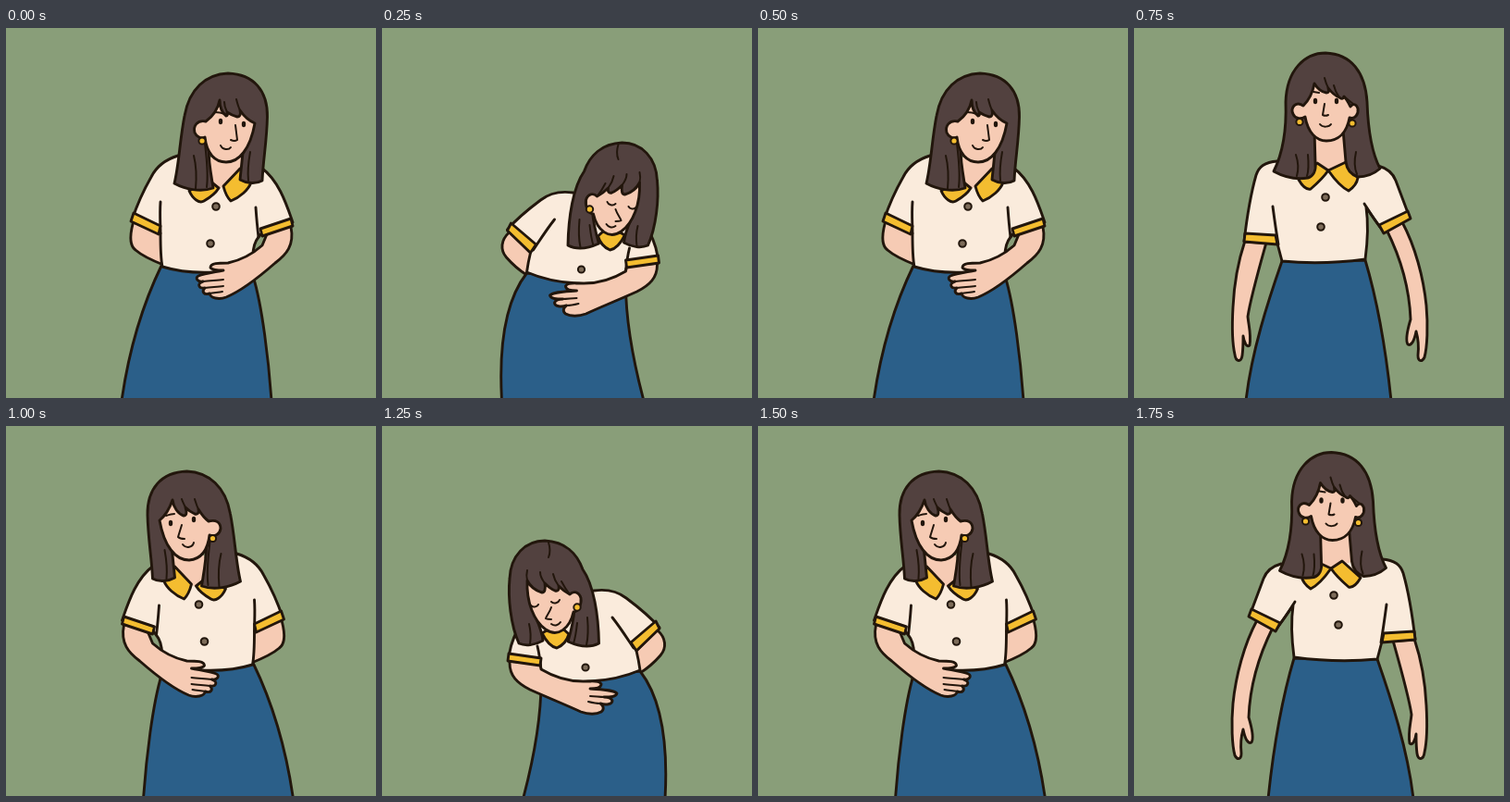
Recreate the animation shown at these times as an HTML page. Size 400x400 px, loop 2000 ms.

```html
<!DOCTYPE html>
<html lang="en">
<head>
<meta charset="utf-8">
<title>Bowing woman</title>
<style>
html, body { margin: 0; width: 100%; height: 100%; overflow: hidden; background: #899e79; }
svg { display: block; width: 100vw; height: 100vh; }
path, circle { fill: none; stroke: #22160c; stroke-width: 2.9; stroke-linecap: round; stroke-linejoin: round; }
.skin { fill: #f6cbb4; }
.hair { fill: #52413f; }
.shirt { fill: #faebdc; }
.gold { fill: #f4bd30; }
.skirt { fill: #2b5f89; }
.thin { stroke-width: 2; }
.button { fill: #7d6c5a; stroke-width: 2; }
.stud { fill: #f4bd30; stroke-width: 2; }
.bare { fill: #f6cbb4; stroke: none; }
.eye { fill: #22160c; stroke: none; }
</style>
</head>
<body>
<svg id="stage" viewBox="0 0 400 400"></svg>
<script>
const shape = (kind, d) => `<path class="${kind}" d="${d}"/>`;
const dot = (kind, r, ...points) => points.map(([x, y]) =>
  `<circle class="${kind}" cx="${x}" cy="${y}" r="${r}"/>`).join('');
const eyes = (...points) => points.map(([x, y]) =>
  `<ellipse class="eye" cx="${x}" cy="${y}" rx="2.2" ry="3.3"/>`).join('');
const flip = (sum, art) => `<g transform="matrix(-1 0 0 1 ${sum} 0)">${art}</g>`;
const shift = (x, y, art) => `<g transform="translate(${x} ${y})">${art}</g>`;

// Upright
const standBody = [
  shape('skin', 'M120 230C112 254 108 280 107 302C106 320 106 340 109 353C110 361 116 362 117 354C118 347 118 340 118 333C119 340 122 346 125 343C127 332 124 322 123 312C126 292 134 264 143 232'),
  shape('skin', 'M290 210C304 236 313 270 316 300C318 322 317 345 314 356C311 362 307 360 307 354C308 345 307 335 305 328C303 338 300 344 296 342C293 337 296 325 299 315C298 288 291 254 273 218'),
  shape('skirt', 'M160 252C145 295 127 350 121 403L278 403C272 345 264 298 250 251Z'),
  shape('shirt', 'M155 144C141 145 135 150 132 159C126 180 122 205 119 231L155 233L160 252C190 255 220 254 250 250C252 235 254 215 251 194L270 221L298 205L283 165C280 157 275 152 264 149'),
  shape('', 'M150 193C152 208 154 222 156 234M249 190C254 198 260 208 266 215'),
  shape('gold', 'M120 222L119 231L155 234L153 224Z'),
  shape('gold', 'M265 213L270 222L299 206L296 198Z'),
  shape('bare', 'M188 112L188 147L210 154L236 146L236 112Z'),
  shape('gold', 'M178 164C182 171 187 175 191 174C198 168 206 160 210 154L198 146Z'),
  shape('gold', 'M210 154C217 164 226 173 232 176C238 172 241 168 242 162L229 145Z'),
  dot('button', 3.8, [207, 183], [202, 215])
].join('');

const standHead = [
  shape('hair', 'M151 155C161 135 165 108 164 80C165 45 185 27 207 27C235 28 250 48 252 80C253 110 257 135 266 152C259 158 252 161 242 161C233 158 230 152 229 145L226 110L195 110L196 146C197 154 194 160 188 162C176 164 162 161 151 155Z'),
  shape('skin', 'M183 84C174 78 169 87 172 93C174 98 180 99 185 96C188 113 197 122 208 122C221 122 230 113 233 97C239 99 243 93 242 87C240 81 236 82 234 85C232 81 230 77 227 74C226 77 224 77 222 75C217 73 213 69 210 65C211 69 210 70 208 70C202 69 198 65 195 60C193 71 189 78 183 84Z'),
  shape('thin', 'M227 74C231 77 234 80 237 82M210 65C208 61 207 58 206 54M222 75C219 71 217 67 216 62M194 69L200 70M206 82L204 94C206 95 208 95 210 94M201 104C204 108 211 107 213 104'),
  shape('thin', 'M175 137C178 146 178 153 176 160M188 137C189 148 189 154 187 160M240 134C238 143 238 151 241 158'),
  eyes([196, 79], [219, 79]),
  dot('stud', 3.6, [179, 101.5], [236, 103])
].join('');

// Half bow: body, hair and arm
const leanBody = [
  shape('skin', 'M137 212C134 224 133 235 140 240C148 247 160 252 170 256L167 218'),
  shape('skirt', 'M168 257C152 290 134 340 125 403L287 403C284 360 277 300 267 268L225 262Z'),
  shape('shirt', 'M186 138C173 142 163 149 157 161C149 175 142 190 136 208L167 222C167 236 167 248 169 258C185 263 205 265 225 264L267 246C267 238 269 231 273 226L277 221L310 210C303 190 295 165 276 151'),
  shape('', 'M167 188C166 202 167 212 167 222M270 194C271 208 272 218 273 226'),
  shape('gold', 'M138 200L135 209L165 223L167 214Z'),
  shape('bare', 'M221 140L222 166L231 174L254 160L255 134Z'),
  shape('gold', 'M198 176C202 185 209 190 214 187C221 183 227 178 230 173L220 165Z'),
  shape('gold', 'M235 171C237 179 240 184 243 187C253 183 262 175 265 167L253 152Z'),
  dot('button', 3.8, [227, 193], [221, 233]),
  shape('hair', 'M182 168C187 148 188 120 193 95C198 66 216 50 240 49C268 50 283 68 282.5 96C282 122 278 142 277 165C270 169 260 168 253 164L257 125L219 130C219 146 222 160 224 173C210 178 193 174 182 168Z'),
  shape('thin', 'M203 138C206 150 206 163 205 174M215 125C217 142 219 157 217 172M264 134C262 145 261 155 262 165')
].join('');

const leanArm = [
  shape('skin', 'M308 215C312 235 303 245 291 254C275 268 255 284 238 291C230 294 221 292 220 287C214 289 211 285 215 281C208 282 206 276 213 274C207 275 204 270 208 268C215 265 225 264 235 262C229 262 223 262 221 259C221 254 230 254 240 254C254 251 268 243 277 235L282 223'),
  shape('thin', 'M213 274C221 273 228 273 235 272M215 281C222 280 229 280 235 279M220 287C225 286 230 286 234 285'),
  shape('gold', 'M275 217L277 225L310 214L308 206Z')
].join('');

const leanRightFace = [
  shape('skin', 'M216 101C207 99 202 106 204 113C206 118 211 120 215 118C217 136 226 145 238 145C252 145 264 131 269 103C262 100 257 95 253 89C254 93 253 96 250 96C246 95 242 93 239 91C240 94 239 95 238 95C233 91 231 86 231 78C229 88 223 96 216 101Z'),
  shape('thin', 'M239 91C237 87 236 84 236 80M253 89C251 85 250 81 249 77M226 91C230 91 234 92 237 93M248 105L250 121C247 123 245 122 243 121M232 127C234 132 241 132 243 129'),
  eyes([232, 101], [257, 104]),
  dot('stud', 3.6, [212, 122])
].join('');

const leanLeftFace = [
  shape('skin', 'M166 102C171 130 183 145 198 145C210 144 218 135 220 118C226 120 231 117 232 111C232 104 227 101 219 103C215 100 211 95 208 90C209 94 207 96 204 95C199 93 196 90 194 88C196 94 195 97 192 97C186 95 181 88 180 80C177 89 172 97 166 102Z'),
  shape('thin', 'M194 88C192 84 191 82 190 79M208 90C206 86 205 82 204 79M173 97C176 96 179 95 182 95M190 107L186 120C188 122 191 122 193 122M191 128C195 133 202 131 203 126'),
  eyes([178, 105], [203, 101]),
  dot('stud', 3.6, [223.5, 121.5])
].join('');

// Full bow
const deepBow = [
  shape('skin', 'M298 221C307 229 308 240 301 248C294 256 287 262 279 267L272 240'),
  shape('skirt', 'M172 268C173 310 164 360 152.5 403L306 403C309 350 304 297 279 265Z'),
  shape('shirt', 'M229 178C243 176 255 179 264 186C276 195 289 205 300 218L275 243C277 251 278 257 279 264C265 270 245 275 225 276C205 277 185 274 172 266L171 258L137 254C137 241 141 231 147 219'),
  shape('', 'M249 207C257 217 264 228 272 240M168 238C170 246 171 253 172 264'),
  shape('gold', 'M269 234L275 243L300 219L296 211Z'),
  shape('gold', 'M173 224C178 234 184 239 189 240C196 237 200 232 202 225L190 214Z'),
  dot('button', 3.6, [220, 261]),
  shape('hair', 'M148 235C139 215 136 185 138 165C139 140 155 124 176 124C198 125 211 138 217 155C229 172 234 205 234.5 235C225 240 212 238 201 233C204 223 207 212 208 198L166 206C169 213 173 222 174 232C165 237 155 238 148 235Z'),
  shape('skin', 'M157 167C156 190 164 211 177 220C190 229 203 219 207 201C212 201 216 193 215 186C213 179 207 178 203 182C199 180 195 177 191 173C192 177 190 179 187 178C182 176 179 173 176 170C177 176 176 180 173 180C166 178 160 173 157 167Z'),
  shape('thin', 'M157 167C156 163 156 160 157 156M176 170C173 166 171 162 171 158M191 173C188 169 186 165 185 160M203 182C199 177 196 172 194 168M180 126C182 132 182 137 180 142'),
  shape('thin', 'M161 194C164 197 168 195 169 193M183 190C186 193 191 191 192 188M183 196C181 202 178 205 177 208C179 209 181 209 183 209M183 214C187 217 191 215 193 212'),
  shape('thin', 'M159 214C161 222 161 229 160 236M222 207C223 218 223 228 221 237M211 213C210 222 209 229 207 235'),
  dot('stud', 3.7, [211, 196]),
  shape('skin', 'M138 256C138 270 146 278 160 285C180 294 200 302 215 309C223 312 232 312 237 309C241 306 239 302 236 300C242 302 249 301 249 297C248 294 244 293 240 293C247 293 253 293 254 289C250 285 238 285 225 284C231 284 237 283 237 279C235 275 229 276 222 276C204 277 187 272 172 263L171 258'),
  shape('thin', 'M240 293C235 293 230 292 225 292M236 300C231 300 227 299 223 298'),
  shape('gold', 'M137 246L136 254L171 259L172 251Z')
].join('');

const leanSum = 435.5;
const leanRight = leanBody + leanRightFace + leanArm;
const leanLeft = flip(leanSum, leanBody) + leanLeftFace + flip(leanSum, leanArm);
const poses = {
  leanRight,
  bowRight: flip(leanSum, deepBow),
  standLeft: standBody + standHead,
  leanLeft,
  bowLeft: deepBow,
  standRight: flip(423, standBody) + shift(6.5, 1.5, standHead)
};
const steps = ['leanRight', 'bowRight', 'leanRight', 'standLeft',
  'leanLeft', 'bowLeft', 'leanLeft', 'standRight'];
const stepTime = 250;

const stage = document.getElementById('stage');
stage.innerHTML = Object.entries(poses)
  .map(([name, art]) => `<g id="${name}" visibility="hidden">${art}</g>`).join('');

const start = performance.now();
let shown = null;

function draw(now) {
  const step = Math.floor(Math.max(0, now - start) / stepTime) % steps.length;
  const next = document.getElementById(steps[step]);
  if (next !== shown) {
    if (shown) shown.setAttribute('visibility', 'hidden');
    next.setAttribute('visibility', 'visible');
    shown = next;
  }
  requestAnimationFrame(draw);
}
draw(start);
</script>
</body>
</html>
```
